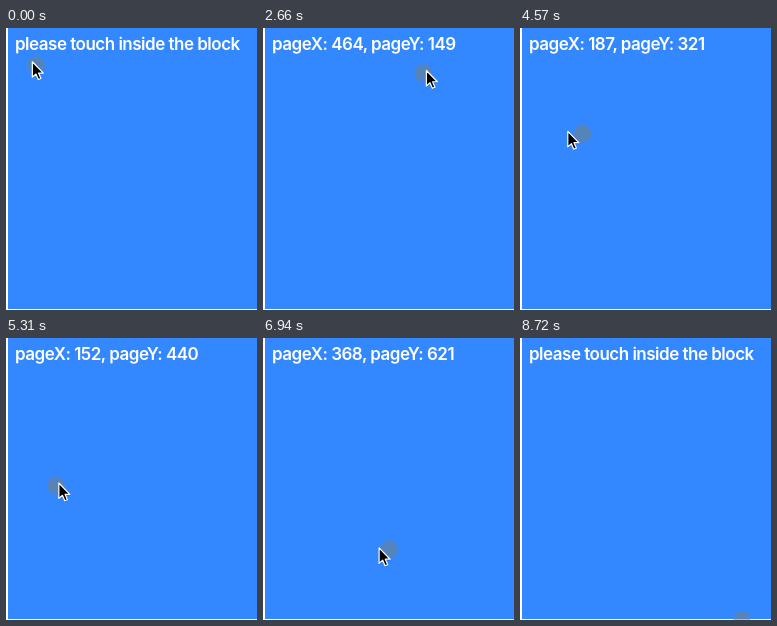
An HTML page for the animation above (9.03 s loop, 251x282 px).

```html
<!DOCTYPE html>
<html lang="en">
<head>
<meta charset="utf-8">
<title>Touch position</title>
<style>
  html, body { margin: 0; width: 100%; height: 100%; overflow: hidden; background: #fff; }
  svg { display: block; }
  text { font: 600 17px Inter, "Liberation Sans", sans-serif; letter-spacing: -0.5px; fill: #fff; }
</style>
</head>
<body>
<svg width="251" height="282" viewBox="0 0 251 282">
  <defs>
    <radialGradient id="soft">
      <stop offset="0.85" stop-color="#778078" stop-opacity="0.5"/>
      <stop offset="1" stop-color="#778078" stop-opacity="0"/>
    </radialGradient>
  </defs>
  <rect x="2" width="249" height="281" fill="#38f"/>
  <text id="label" x="9" y="22"></text>
  <circle id="dot" r="9.5" fill="url(#soft)"/>
  <g id="cursor" stroke-linejoin="round">
    <path d="M0 1.5V17L4 13.5 6.5 19 9 18 6.5 12.5H11.5Z" opacity="0.2"/>
    <path d="M0 0V15.5L3.6 12.3 6 17.8 8.6 16.7 6.2 11.3H11Z" stroke="#fff" stroke-width="1.2"/>
  </g>
</svg>
<script>
const LOOP = 9030, STEP = 147.5, LAST = 59;
const PRESS = 11, RELEASE = 58;
const LEAD = 0.33; // the arrow runs this many steps ahead of the dot

// Zigzag sweep down the block: step, x, y
const path = [
  [0, 30, 37], [5, 18, 58], [9, 30, 41], [14, 50, 38],
  [18, 160.25, 45.07], [22, 222, 62], [26, 225.97, 87.32],
  [33, 22, 115], [36, 50, 147.54], [41, 220, 157],
  [47, 126.33, 211.27], [51, 39, 233], [56, 210, 268], [LAST, 222, 282]
];

const [label, dot, cursor] = ["label", "dot", "cursor"].map(id => document.getElementById(id));

const rate = (a, b, axis) => (b[axis] - a[axis]) / (b[0] - a[0]);

// Harmonic mean of both sides; flat at the ends and at turning points
function slope(i, axis) {
  if (i === 0 || i === path.length - 1) return 0;
  const before = rate(path[i - 1], path[i], axis), after = rate(path[i], path[i + 1], axis);
  return before * after > 0 ? 2 * before * after / (before + after) : 0;
}

function position(step) {
  const s = Math.min(step, LAST);
  const i = Math.max(path.findIndex(p => p[0] >= s), 1);
  const a = path[i - 1], b = path[i], span = b[0] - a[0], u = (s - a[0]) / span;
  return [1, 2].map(k =>
    a[k] + (b[k] - a[k]) * u * u * (3 - 2 * u) +
    span * u * (1 - u) * (slope(i - 1, k) * (1 - u) - slope(i, k) * u));
}

function draw(now) {
  const step = Math.min(Math.floor((now % LOOP + 5) / STEP), LAST);
  const [x, y] = position(step), [tipX, tipY] = position(step + LEAD);
  const touching = step >= PRESS && step < RELEASE;
  label.textContent = touching
    ? `pageX: ${Math.round(2.83 * x + 10.5)}, pageY: ${Math.round(2.84 * y + 21)}`
    : "please touch inside the block";
  dot.setAttribute("cx", x);
  dot.setAttribute("cy", y);
  cursor.setAttribute("transform", `translate(${tipX - 3.5} ${tipY - 3.5})`);
  cursor.setAttribute("visibility", step < LAST ? "visible" : "hidden");
}

const start = performance.now();
function tick() {
  draw(performance.now() - start);
  requestAnimationFrame(tick);
}
tick();
</script>
</body>
</html>
```
